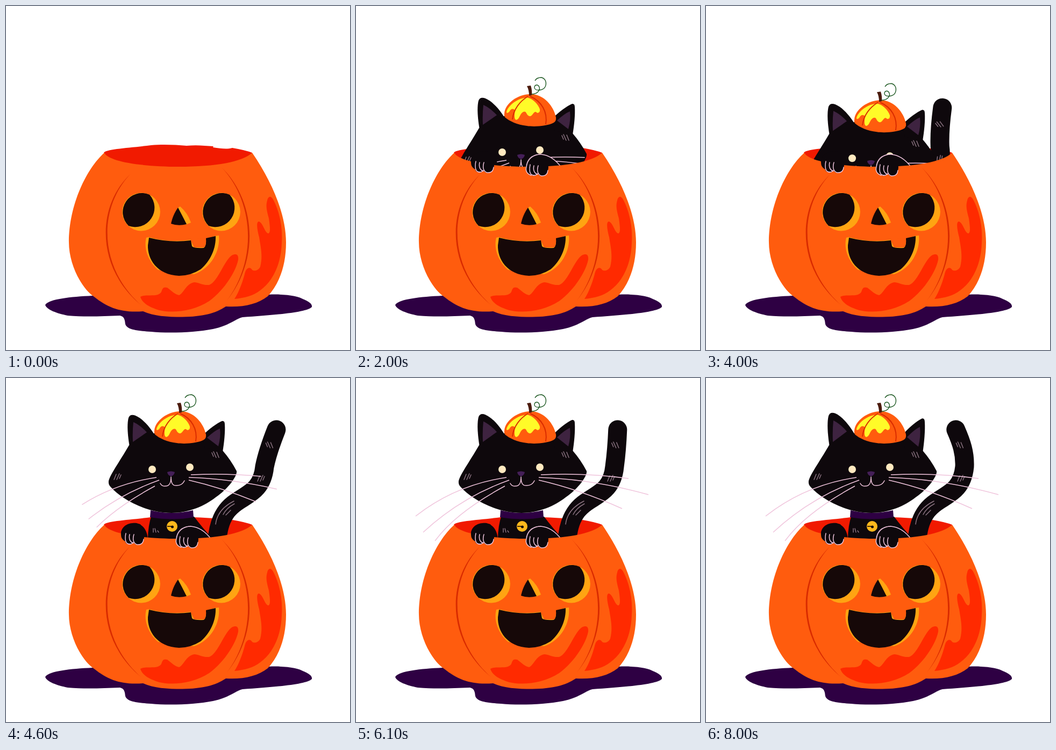
Animation, 640 px wide and 640 px high, one loop 8100 ms. Source, as an HTML page:

```html
<!DOCTYPE html>
<html lang="en">
<head>
<meta charset="utf-8">
<title>Cat in a pumpkin</title>
<style>
  html, body { margin: 0; width: 100%; height: 100%; overflow: hidden; background: #fff; }
  svg { display: block; width: 100vw; height: 100vh; }
  .black { fill: #0e080c; }
  .hole { fill: #160808; }
  .orange { fill: #ff5c0e; }
  .red { fill: #ff2a00; }
  .crease { fill: #d92b00; }
  .glow { fill: #ffa412; }
  .purple { fill: #3e2340; }
  .night { fill: #2e0043; }
  .pink, .fur { fill: none; stroke: #f0c4dc; stroke-width: 1.5; stroke-linecap: round; }
  .fur { stroke: #8a7280; }
  #tailShape { fill: none; stroke: #0e080c; stroke-width: 35; stroke-linecap: round; }
  #whiskers { stroke-linecap: butt; }
</style>
</head>
<body>
<svg viewBox="0 0 640 640">
  <defs>
    <clipPath id="aboveRim"><path d="M0 0H640V304H0Z"/></clipPath>
    <g id="socket">
      <circle class="glow" cx="251.5" cy="383" r="35.4"/>
      <path class="hole" d="M267 351A36 36 0 0 1 228 409A35.5 35.5 0 0 1 267 351Z"/>
    </g>
    <path id="tuft" class="fur" d="M-6 5l4 -10M-1 5l5 -11M4 3l3 -7"/>
    <path id="toes" class="pink" d="M223 289C221 298 222 306 226 308Q232 311 237 306M230 291C228 299 231 306 237 307M238 291C235 300 237 308 244 310Q255 311 256 300"/>
  </defs>

  <path class="night" d="M73 556C80 545 120 541 161 539L487 537C520 535 545 540 552 545C565 550 570 555 569 560C560 570 500 575 440 579C425 583 415 595 385 601C350 608 300 609 270 606C235 604 225 600 222 592C221 585 221 578 212 576C180 577 150 579 115 576C95 572 75 565 73 556Z"/>
  <path fill="#f11a00" d="M182 273C185 266 230 264 270 259C290 257 315 258 336 260C355 258 370 260 386 261L385 263C400 265 410 267 421 264Q445 268 458 273L440 310H200Z"/>

  <g clip-path="url(#aboveRim)">
    <g id="tail">
      <path id="tailShape"/>
      <use id="tailTuft" href="#tuft"/>
      <use href="#tuft" x="474" y="187"/>
      <path class="fur" d="M390 272C392 255 402 240 424 229M404 254Q410 242 425 234M409 255l9 -9"/>
    </g>

    <g id="cat">
      <path class="black" d="M271 255Q264 275 264 300V330H390L385 300Q365 278 350 258Z"/>
      <path class="fur" d="M274 280v7M277 280l2 7M282 284l2 3"/>
      <path class="night" d="M269 246Q308 256 348 246L349 259Q310 266 268 259Z"/>
      <circle cx="309" cy="276" r="10" fill="#ffb81c"/>
      <path d="M300 276H309" stroke="#160808" stroke-width="1.6"/>
      <circle class="hole" cx="309.5" cy="277" r="2.5"/>
      <g id="earL">
        <path class="black" d="M230 128C226 105 225 85 228 74Q231 66 241 70C255 76 268 92 276 105L262 130Z"/>
        <path class="purple" d="M237 82Q235 100 236 119L262 101Q250 88 237 82Z"/>
      </g>
      <path class="black" d="M191 195C189 186 210 158 229 125C250 108 280 98 320 98C360 98 392 122 403 135Q418 152 429 173C431 181 415 205 390 222C370 238 340 251 308 251C260 251 215 225 195 203Q191 199 191 195Z"/>
      <g id="earR">
        <path class="black" d="M365 108C378 94 393 84 402 80Q407 79 407 86C408 100 406 120 403 138L370 130Z"/>
        <path class="purple" d="M398 94Q388 98 374 111L395 127Q400 110 398 94Z"/>
      </g>
      <use href="#tuft" transform="translate(390 143) scale(-1 1)"/>
      <use href="#tuft" x="207" y="184"/>
      <g fill="#ffe9c0"><circle cx="272" cy="170" r="7"/><circle cx="342" cy="166" r="7"/></g>
      <path fill="#451f58" d="M300 175Q307 172 314 175Q313 181 307 183Q300 180 300 175Z"/>
      <path class="pink" d="M307 184C307 196 304 201 297 201Q290 202 287 196M307 184C307 196 310 201 318 200Q328 200 332 191"/>
      <g id="whiskers" class="pink">
        <path pathLength="1" d="M280 185Q185 199 111 257"/>
        <path pathLength="1" d="M285 190Q195 222 125 287"/>
        <path pathLength="1" d="M277 201Q186 250 147 303"/>
        <path pathLength="1" d="M344 180Q430 176 507 187"/>
        <path pathLength="1" d="M340 185Q440 188 544 217"/>
        <path pathLength="1" d="M340 190Q415 207 495 243"/>
      </g>
      <path class="orange" d="M276 98C277 80 300 62 325 62C350 62 368 85 372 105Q373 112 368 115C355 122 330 123 318 121C300 119 285 112 277 105Q275 101 276 98Z"/>
      <path fill="#fffb28" d="M280 95C283 84 297 72 313 69L318 68C330 71 338 80 342 90Q343 97 337 97C331 90 329 104 323 103C316 101 318 92 311 95C304 99 305 108 298 110Q293 108 296 92Q290 86 285 95Q280 99 280 95Z"/>
      <path fill="none" stroke="#d92b00" stroke-width="2" d="M320 66C305 75 293 90 291 109M324 66C345 75 357 95 353 118"/>
      <path fill="#4a1a0c" d="M318 47L325 46Q328 55 327 64L322 65Q322 54 318 47Z"/>
      <path fill="none" stroke="#1f5a24" stroke-width="1.4" d="M327 62C337 62 343 55 341 49C339 43 332 44 332 50C333 56 345 56 351 50C356 42 353 33 345 31C340 31 335 33 333 37"/>
    </g>

    <path id="armL" class="black" d="M216 340V300L214 289C216 272 232 269 243 270C256 273 263 285 264 300V340Z"/>
    <path id="armR" class="black" stroke="#f0c4dc" stroke-width="1.5" d="M317 340V302C316 287 327 276 344 276C360 277 372 287 382 300L390 340Z"/>
    <g id="behind"></g>
  </g>

  <path class="orange" d="M183 273C150 302 117 370 117 440C117 480 140 525 164 541C190 562 215 571 255 568C275 577 300 578.5 328 578.5C365 578 390 572 409 559C440 561 468 555 487 540C510 515 521 480 521 440C521 390 497 330 458 273C440 290 390 299 322 299C250 299 190 289 183 273Z"/>
  <path class="red" d="M250 541C262 535 282 543 289 532C291 525 293 522 300 524C308 530 315 537 322 538C330 535 335 517 350 514C358 514 365 520 378 519C395 512 405 475 420 464C428 460 433 462 432 472C427 497 403 531 378 549C349 568 310 572 285 566C265 560 253 552 250 541Z"/>
  <path class="red" d="M486 362C488 352 494 354 497 360C508 380 515 410 513 440C512 479 497 512 473 529C460 539 445 543 425 545C432 535 440 515 445 495C448 486 455 485 458 491C462 494 470 492 473 485C478 465 474 450 471 430C467 415 465 400 471 401C478 404 481 420 487 423C493 424 491 410 489 395C485 380 483 372 486 362Z"/>
  <path class="crease" d="M231 313C166 375 169 490 252 557C173 488 170 378 231 313ZM401 300C464 362 473 470 411 548C469 470 460 362 401 300Z"/>

  <use href="#socket"/>
  <use href="#socket" x="149"/>
  <path class="glow" d="M320 375L324 373Q338 385 344 403L334 407Z"/>
  <path class="hole" d="M320 375C313 385 309 395 307 405Q320 410 336 406Q328 390 320 375Z"/>
  <path class="glow" d="M266 430L261 431C256 450 264 475 283 491L350 499C382 488 399 455 396 427L388 428L372 433L370 449H350L343 435Q305 441 266 430Z"/>
  <path class="hole" d="M266 431Q305 441 344 436L346 447Q350 451 368 450Q373 447 372 432L390 428C391 450 381 474 362 490Q343 502 322 502C280 500 263 470 264 445Z"/>
  <path class="orange" d="M347 434L349 444Q352 449 368 449Q373 446 372 431Z"/>

  <g id="front">
    <g id="handL">
      <path class="black" d="M214 292C213 280 222 271 240 270L250 272L257 296Q257 309 247 310Q240 311 237 306Q233 311 227 309Q222 308 222 304Q214 300 214 292Z"/>
      <use href="#toes"/>
    </g>
    <g id="handR">
      <path class="black" d="M316 300C317 285 328 276 344 276L357 291L358 300Q357 314 348 316Q341 317 338 312Q333 318 327 315Q316 312 316 300Z"/>
      <use href="#toes" x="101" y="6"/>
      <path class="pink" d="M326 315Q314 311 317 299C319 284 330 276 344 276"/>
    </g>
  </g>
</svg>
<script>
const LOOP = 8100, STEP = 100;
const $ = id => document.getElementById(id);
const move = (id, value) => $(id).setAttribute("transform", value);

// Progress from 0 to 1 between two times, and easings of it.
const span = (t, from, to) => Math.min(1, Math.max(0, (t - from) / (to - from)));
const easeOut = p => Math.sin(p * Math.PI / 2);
const easeInOut = p => (1 - Math.cos(p * Math.PI)) / 2;

// A paw rises behind the rim, then drops over it.
function drawPaw(side, t, start) {
  const peak = start + 400;
  const y = 45 - 63 * easeOut(span(t, start, peak)) + 18 * easeInOut(span(t, peak, peak + 300));
  move("arm" + side, `translate(0 ${y})`);
  move("hand" + side, `translate(0 ${y})`);
  const layer = t < peak ? $("behind") : $("front"), hand = $("hand" + side);
  if (hand.parentNode !== layer) layer.append(hand);
}

// Peek out, wait, crouch, leap up.
function catY(t) {
  return 102 + 173 * (1 - span(t, 1500, 2000)) ** 2
    + 58 * easeOut(span(t, 3300, 3800)) - 160 * easeInOut(span(t, 3800, 4350));
}

function drawEar(id, sway, amount) {
  move(id, `translate(0 120) scale(1 ${1 + amount * (1 - sway)}) translate(0 -120)`);
}

function drawTail(t, sway, y) {
  const drop = Math.max(0, 4000 - t) * .058;
  const turn = -28 * (1 - span(t, 3400, 4600));
  const tip = 483 + 19 * sway;
  $("tailShape").setAttribute("d",
    `M392 320C392 200 473 245 481 165C${484 + 2 * sway} 140 ${484 + 9 * sway} 120 ${tip} 96`);
  move("tailTuft", `translate(${481 + 9 * sway} 125) scale(-1 1)`);
  move("tail", `translate(0 ${y + drop}) rotate(${turn} 390 343)`);
}

function draw(t) {
  drawPaw("L", t, 0);
  drawPaw("R", t, 700);

  const y = catY(t);
  const sway = .2 + 1.2 * Math.cos(2 * Math.PI * (Math.max(t, 4600) - 4300) / 2400);
  move("cat", `translate(0 ${y})`);
  drawEar("earL", sway, .04);
  drawEar("earR", sway, .06);
  drawTail(t, sway, y);
  $("whiskers").style.strokeDasharray = `${.5 + .5 * span(t, 4000, 5000)} 2`;
}

const start = performance.now();
function tick() {
  const t = (performance.now() - start) % LOOP;
  draw(Math.floor(t / STEP) * STEP);
  requestAnimationFrame(tick);
}
tick();
</script>
</body>
</html>
```
